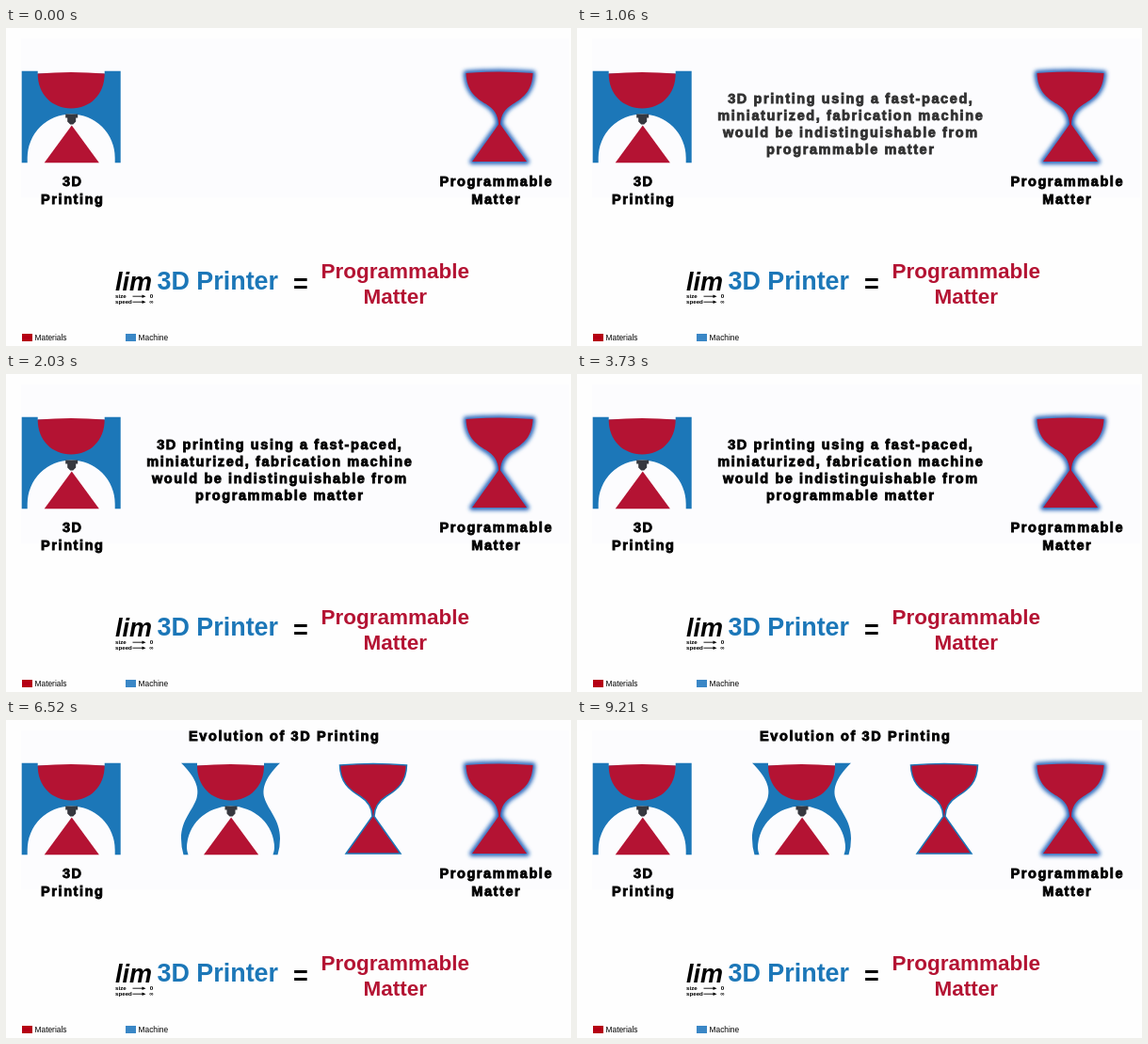
Recreate the animation shown at these times as an HTML page. Size 600 by 338 pixels, loop 9.73 s.

```html
<!DOCTYPE html>
<html lang="en">
<head>
<meta charset="utf-8">
<title>Evolution of 3D Printing</title>
<style>
  html, body { margin: 0; width: 100%; height: 100%; overflow: hidden; background: #fefefe; }
  svg { display: block; width: 100vw; height: 100vh; }
  text { font-family: "Liberation Sans", Arial, sans-serif; }
  .heavy text {
    font-size: 14.5px; font-weight: 700; letter-spacing: .11em; text-anchor: middle;
    stroke: #000; stroke-width: .85; stroke-linejoin: miter;
  }
  .bold { font-weight: 700; }
  .mid { text-anchor: middle; }
  .red { fill: #b41333; }
  .blue { fill: #1c77b8; }
  .statement { opacity: 0; animation: statement 9730ms infinite; }
  .evolution { opacity: 0; animation: evolution 9730ms step-end infinite; }
  @keyframes statement {
    0% { opacity: 0; animation-timing-function: step-end; }
    4.419% { opacity: 0; animation-timing-function: ease-in-out; }
    13.669% { opacity: 1; animation-timing-function: step-end; }
    60.74%, 100% { opacity: 0; }
  }
  @keyframes evolution {
    0% { opacity: 0; }
    60.74%, 100% { opacity: 1; }
  }
</style>
</head>
<body>
<svg viewBox="0 0 600 338">
  <defs>
    <filter id="blur" x="-30%" y="-30%" width="160%" height="160%">
      <feGaussianBlur stdDeviation="2.2"/>
    </filter>
    <!-- Icons are centred on x = 0 -->
    <g id="printer">
      <path class="red" d="M-35.5 48.6Q0 45.5 35.5 48.6C35.5 71 20 85.5 0 85.5S-35.5 71 -35.5 48.6Z"/>
      <path fill="#36383f" d="M-6 91.6H7V95.4H5V99.5L2 102.5H-1L-4 99.5V95.4H-6Z"/>
      <path class="red" d="M.6 103.4L29.7 143.3H-28.5Z"/>
    </g>
    <path id="hourglass" d="M-35.5 48Q0 45 35.5 48C35 66 26 74 14 81C6 86 1.2 92 1 102.5L29 142H-29L-1 102.5C-1.2 92 -6 86 -14 81C-26 74 -35 66 -35.5 48Z"/>
    <g id="arrow">
      <path d="M0 0H11" stroke="#000" stroke-width=".9"/>
      <path d="M10 -1.8L14 0L10 1.8Z"/>
    </g>
  </defs>

  <rect x="16" y="11" width="582" height="169" fill="#fcfcfe"/>

  <g transform="translate(69.2 0)">
    <path class="blue" d="M-52.5 45.8H-35.5V48.6H35.5V45.8H52.5V143.3H46.5V138A46.5 46.5 0 0 0 -46.5 138V143.3H-52.5Z"/>
    <use href="#printer"/>
  </g>

  <g transform="translate(524 0)">
    <use href="#hourglass" fill="none" stroke="#1d5fb8" stroke-width="5.5" stroke-linejoin="round" filter="url(#blur)"/>
    <use href="#hourglass" class="red"/>
  </g>

  <!-- The offset balances the trailing letter space -->
  <g class="heavy" transform="translate(.8 0)">
    <text x="70" y="168">3D</text>
    <text x="70" y="186.5">Printing</text>
    <text x="520" y="168">Programmable</text>
    <text x="520" y="186.5">Matter</text>
    <g class="statement">
      <text x="290" y="79.5">3D printing using a fast-paced,</text>
      <text x="290" y="97.7">miniaturized, fabrication machine</text>
      <text x="290" y="115.9">would be indistinguishable from</text>
      <text x="290" y="134.1">programmable matter</text>
    </g>
    <g class="evolution"><text x="295" y="21.6">Evolution of 3D Printing</text></g>
  </g>

  <g class="evolution">
    <g transform="translate(238.5 0)">
      <path class="blue" d="M-52.5 45.8H-35.5V48.6H35.5V45.8H52.5C41 57 32 70 36 83C40 96 52.5 106 52.5 126Q52.5 135 50 143.3H45Q46.5 139 46.5 136A46.5 44.5 0 0 0 -46.5 136Q-46.5 139 -45 143.3H-50Q-52.5 135 -52.5 126C-52.5 106 -40 96 -36 83C-32 70 -41 57 -52.5 45.8Z"/>
      <use href="#printer"/>
    </g>
    <use href="#hourglass" x="390" class="red" stroke="#1c77b8" stroke-width="1.5"/>
  </g>

  <g class="bold">
    <text x="116" y="278.5" font-size="27" font-style="italic">lim</text>
    <g font-size="6.2">
      <text x="116" y="287">size</text>
      <text x="116" y="293">speed</text>
      <text class="mid" x="154.5" y="287">0</text>
      <text class="mid" x="154.5" y="293">∞</text>
    </g>
    <use href="#arrow" x="134.5" y="285.2"/>
    <use href="#arrow" x="134.5" y="291.2"/>
    <text class="blue" x="160.5" y="278" font-size="26.9">3D Printer</text>
    <text class="mid" x="313" y="281" font-size="27">=</text>
    <g class="red mid" font-size="22.5">
      <text x="413.3" y="266">Programmable</text>
      <text x="413.3" y="293">Matter</text>
    </g>
  </g>

  <g font-size="8.4">
    <rect x="17" y="325" width="11" height="8" fill="#b50014"/>
    <text x="30.5" y="332">Materials</text>
    <rect x="127" y="325" width="11" height="8" fill="#3a87c6"/>
    <text x="140.5" y="332">Machine</text>
  </g>
</svg>
</body>
</html>
```
